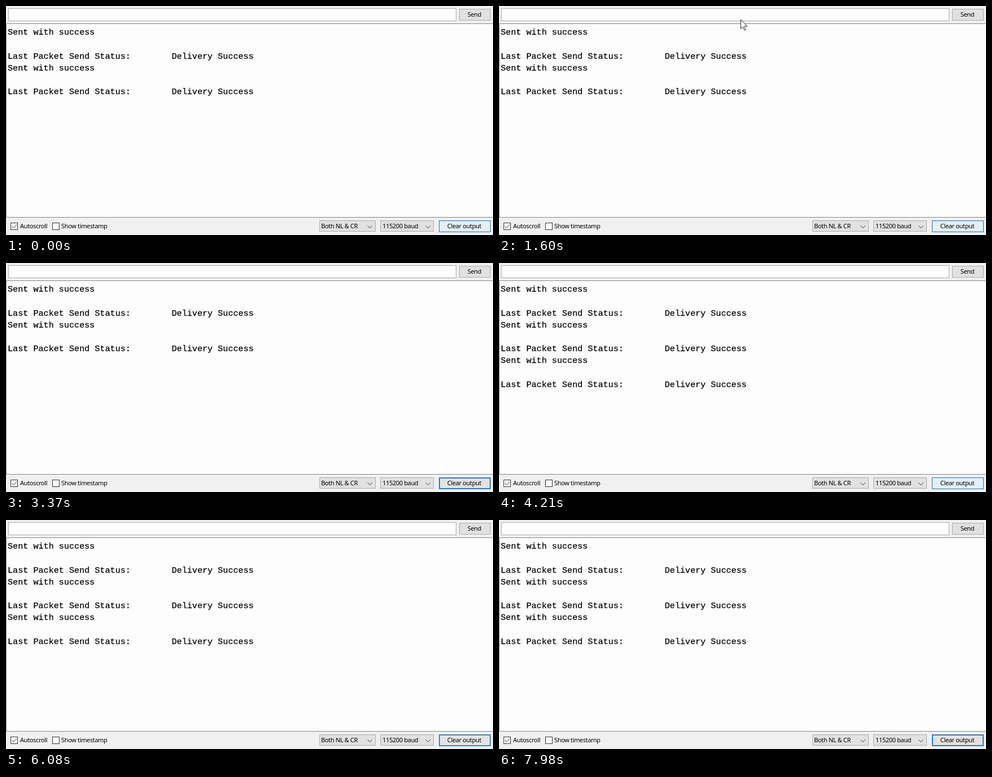
Write an HTML page that moves like this. It is 864x408 px and loops after 8 s.

```html
<!DOCTYPE html>
<html lang="en">
<head>
<meta charset="utf-8">
<title>Serial monitor</title>
<style>
  html, body { margin: 0; width: 100%; height: 100%; overflow: hidden; background: #f0f0f0; }
  svg { display: block; width: 864px; height: 408px; }
  .box { fill: #fdfdfd; stroke: #abadb3; }
  .control { fill: #e1e1e1; stroke: #adadad; }
  .line { fill: none; stroke: #333; }
  .check { fill: #fdfdfd; stroke: #333; }
  .ui { font: 11px "Noto Sans", "Open Sans", sans-serif; letter-spacing: -.35px; fill: #000; }
  .mid { text-anchor: middle; }
  .log { font: 15.15px "Courier New", "Liberation Mono", monospace; fill: #000; stroke: #000; stroke-width: .25px; }
  .new { animation: arrive 8s step-end infinite; }
  .glow { animation: pulse 8s ease-in-out infinite; }
  .pointer { animation: move 8s linear infinite; }
  @keyframes arrive { 0% { visibility: hidden; } 47.5%, 100% { visibility: visible; } }
  /* 2.5 s breathing of the default button */
  @keyframes pulse {
    0% { opacity: .1; }
    8.125%, 39.375%, 70.625% { opacity: 1; }
    23.75%, 55%, 86.25% { opacity: 0; }
    100% { opacity: .93; }
  }
  @keyframes move {
    0%, 6% { transform: translate(-16px, 84px); }
    8.5% { transform: translate(30px, 50px); }
    10.875% { transform: translate(84px, 28px); }
    14% { transform: translate(200px, 8px); }
    18% { transform: translate(360px, 6px); }
    23% { transform: translate(530px, 50px); }
    28.875% { transform: translate(642px, 117px); }
    32% { transform: translate(745px, 180px); }
    35%, 100% { transform: translate(868px, 250px); }
  }
</style>
</head>
<body>
<svg viewBox="0 0 864 408">
  <defs>
    <g id="entry" class="log">
      <text x="3" y="51">Sent with success</text>
      <text x="3" y="93.5">Last Packet Send Status:</text>
      <text x="294" y="93.5">Delivery Success</text>
    </g>
    <path id="arrow" class="line" d="M0 0l4 4 4-4"/>
  </defs>
  <rect width="864" height="408" fill="#f0f0f0"/>
  <rect class="box" x="4.5" y="4.5" width="794" height="22"/>
  <rect class="control" x="804.5" y="5.5" width="55" height="20"/>
  <text class="ui mid" x="831" y="19">Send</text>

  <rect y="31" width="864" height="346" fill="#fdfdfd"/>
  <path d="M864 31.5H.5V376.5H864" fill="none" stroke="#828790"/>
  <use href="#entry"/>
  <use href="#entry" y="63.6"/>
  <use href="#entry" y="127.2" class="new"/>

  <rect class="check" x="8.5" y="386.5" width="12" height="12"/>
  <path class="line" d="M10.5 392.5l3 3 5.5-6"/>
  <text class="ui" x="25" y="396">Autoscroll</text>
  <rect class="check" x="82.5" y="386.5" width="12" height="12"/>
  <text class="ui" x="98" y="396">Show timestamp</text>

  <rect class="control" x="556.5" y="382.5" width="99" height="19"/>
  <text class="ui" x="559" y="396">Both NL &amp; CR</text>
  <use href="#arrow" x="641.5" y="391.5"/>
  <rect class="control" x="664.5" y="382.5" width="94" height="19"/>
  <text class="ui" x="668" y="396">115200 baud</text>
  <use href="#arrow" x="744.5" y="391.5"/>

  <rect x="768.5" y="382.5" width="91" height="20" fill="#e5f1fb" stroke="#2a78b8"/>
  <rect class="glow" x="769" y="383" width="90" height="19" fill="#e1e1e1" stroke="#2a78b8" stroke-width="2"/>
  <text class="ui mid" x="813" y="396">Clear output</text>

  <path class="pointer" d="M.5.5V17l3.8-3.7 2.5 6 2.5-1-2.6-6h5.1z" fill="#fdfdfd" stroke="#222"/>
</svg>
</body>
</html>
```
